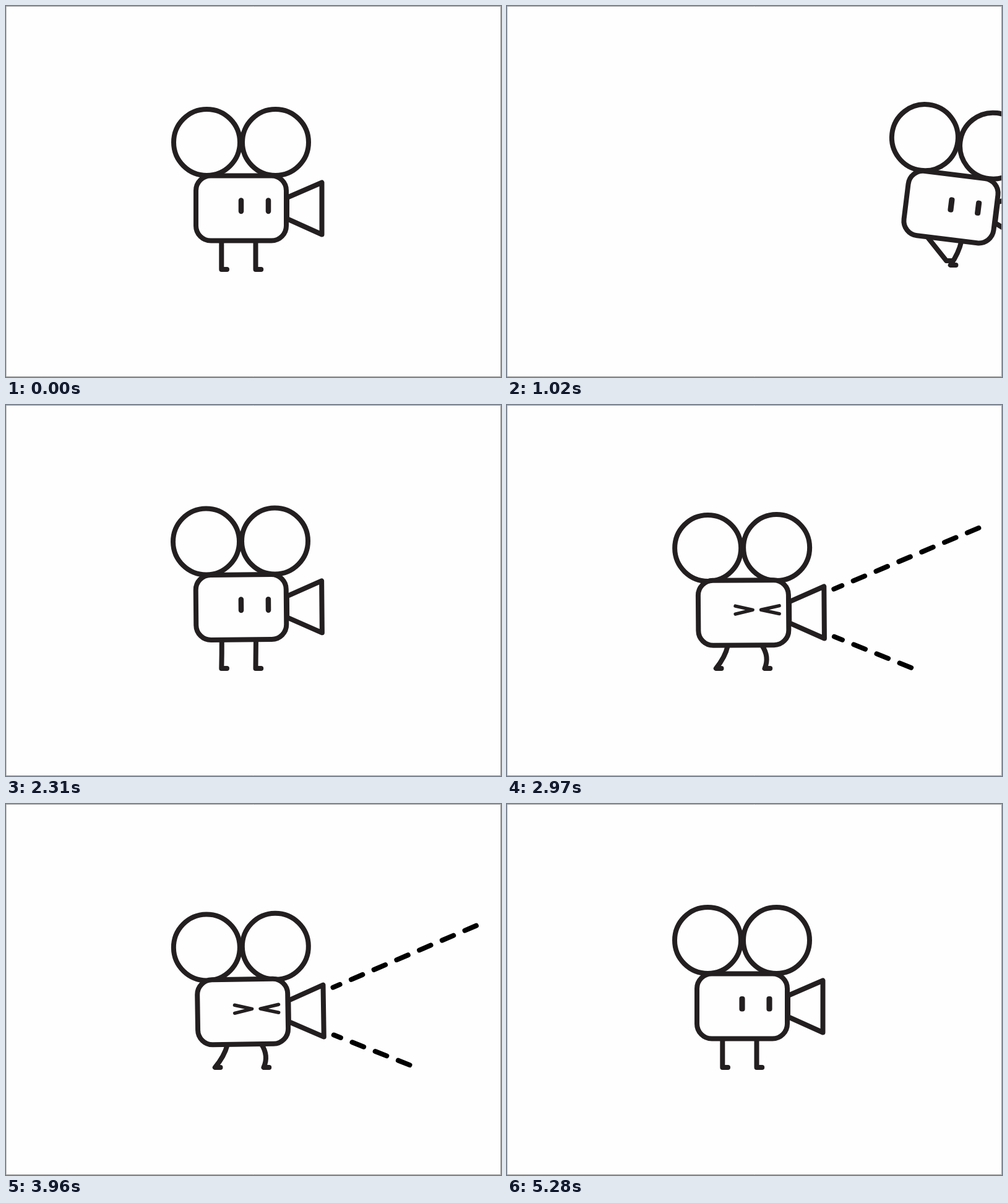
An HTML page with a canvas that plays this animation: 800 px wide and 600 px high, repeating every 5.31 s.

```html
<!DOCTYPE html>
<html lang="en">
<head>
<meta charset="utf-8">
<title>Film camera</title>
<style>
  html, body { margin: 0; height: 100%; overflow: hidden; background: #fefefe; }
  canvas { display: block; }
</style>
</head>
<body>
<canvas id="stage" width="800" height="600"></canvas>
<script>
const ctx = document.getElementById('stage').getContext('2d');
const LOOP = 5310, STEP = 30;
const INK = '#231f20', PAPER = '#fefefe';
const HOME = { x: 380, y: 327 }, FLOOR = 426, LEG = 46;
const RUN = 690, OFFSTAGE = 1230, LAND = 1740, SPEED = 1.25;

const mixPoint = (p, q, k) => p.map((v, i) => v + (q[i] - v) * k);
const progress = (t, from, to) => Math.min(1, Math.max(0, (t - from) / (to - from)));
const ease = (t, from, to) => {
  const x = progress(t, from, to);
  return x * x * (3 - 2 * x);
};
// Rises between a and b, falls between c and d.
const pulse = (t, a, b, c, d) => ease(t, a, b) - ease(t, c, d);
const hump = (t, from, to) => Math.sin(Math.PI * progress(t, from, to)) ** 2;
const arc = (t, from, to) => {
  const x = progress(t, from, to);
  return 4 * x * (1 - x);
};

const airborne = t => pulse(t, 110, 190, 400, 480) + pulse(t, OFFSTAGE, 1260, 1640, LAND);
const running = t => pulse(t, RUN, 760, 1200, 1260);
const strain = t => pulse(t, 2430, 2640, 4080, 4260);
const squint = t => pulse(t, 2580, 2670, 4080, 4170);
const blink = t => [600, 1380, 2430, 3990, 4860]
  .reduce((sum, s) => sum + pulse(t, s, s + 150, s + 270, s + 450), 0);

function runDistance(t) {
  const time = Math.max(0, t - RUN), warmUp = 120;
  return SPEED * (time < warmUp ? time * time / (2 * warmUp) : time - warmUp / 2);
}

// Offset from the resting place and tilt in degrees.
function getMove(t) {
  if (t < OFFSTAGE) {
    return {
      x: runDistance(t) - 34 * pulse(t, 100, 380, 380, 510),
      y: 14 * (hump(t, 0, 200) + hump(t, 410, 570)) - 215 * arc(t, 120, 460)
        + 8 * hump(t, 660, 780) + 3 * running(t) * Math.sin(t / 45),
      tilt: 7 * ease(t, RUN, 810) - 360 * ease(t, 120, 450)
    };
  }
  if (t < 2430) {
    const sway = hump(t, 1770, 2130);
    return {
      x: Math.min(0, SPEED * (t - LAND + 2.5)) + 20 * sway,
      y: 14 * hump(t, LAND, 2000) - 68.5 * arc(t, OFFSTAGE + 10, LAND),
      tilt: 15 * (ease(t, 1440, LAND) - 1) + 6 * sway - 1.8 * hump(t, 2040, 2370)
    };
  }
  const s = strain(t), u = t - 3540;
  return {
    x: s * (3.3 + 1.2 * Math.cos(u / 20)),
    y: s * (10 + Math.cos(u / 26)),
    tilt: s * (0.5 * Math.sin(u / 23) - 0.6)
  };
}

function strokeLine(points, close) {
  ctx.beginPath();
  points.forEach(p => ctx.lineTo(...p));
  if (close) ctx.closePath();
  ctx.stroke();
}

// Leap shapes (knee, ankle, toe) are measured from the body centre.
const LEGS = [
  { hip: -31.7, stance: -10.5, phase: 0, leap: [[-45, 78], [-74.6, 65], [-76, 70.6]] },
  { hip: 23.5, stance: 13, phase: Math.PI, leap: [[56, 52.8], [67, 77.4], [73.4, 74.2]] }
];

function drawLeg(leg, t, pose) {
  const c = Math.cos(pose.angle), s = Math.sin(pose.angle);
  const toStage = ([x, y]) => [pose.x + x * c - y * s, pose.y + x * s + y * c];
  const hip = toStage([leg.hip + 6 * strain(t), 53]);
  const run = running(t), phase = (t - RUN) / 45 + leg.phase;
  const carried = t < OFFSTAGE ? runDistance(t) : 0;
  const ankle = [
    HOME.x + leg.hip + carried + strain(t) * leg.stance + run * 28 * Math.sin(phase),
    FLOOR - run * (7 + 14 * Math.max(0, Math.cos(phase)))
  ];
  const reach = Math.hypot(hip[0] - ankle[0], hip[1] - ankle[1]);
  const middle = mixPoint(hip, ankle, 0.5);
  const knee = [middle[0] + 1.2 * Math.max(0, LEG - reach), middle[1]];
  const standing = [knee, ankle, [ankle[0] + 8.7, ankle[1]]];
  const [bend, heel, toe] = standing.map((p, i) =>
    mixPoint(p, toStage(leg.leap[i]), airborne(t)));
  ctx.beginPath();
  ctx.moveTo(...hip);
  ctx.quadraticCurveTo(...bend, ...heel);
  ctx.lineTo(...toe);
  ctx.stroke();
}

function drawBody(t) {
  const sink = strain(t);
  for (const x of [-55.5, 55.5]) {
    ctx.beginPath();
    ctx.arc(x - 1.2 * sink, -106.5 + 1.5 * sink, 53.5, 0, 7);
    ctx.stroke();
  }
  strokeLine([[74, -17], [130.5, -41.5], [130.5, 42.5], [74, 17]], true);
  ctx.fillStyle = PAPER;
  ctx.beginPath();
  ctx.roundRect(-73, -52.5, 146, 105, 24);
  ctx.fill();
  ctx.stroke();
}

function drawEyes(t) {
  const open = squint(t);
  if (open > 0) {
    ctx.lineWidth = 5.5;
    const h = 6.5 * open;
    for (const [outer, tip] of [[-13, 15], [58, 28.5]]) {
      strokeLine([[outer, -4.5 - h], [tip, -4.5], [outer, -4.5 + h]]);
    }
    return;
  }
  const b = blink(t), w = 8.5 + 8.5 * b, h = 26 - 21 * b;
  ctx.fillStyle = INK;
  for (const x of [0, 44]) {
    ctx.beginPath();
    ctx.roundRect(x - w / 2, -3.7 - h / 2, w, h, 4.2 - 3 * b);
    ctx.fill();
  }
}

function drawBeams(t) {
  const from = ease(t, 4080, 4230), to = ease(t, 2580, 2820);
  if (from >= to) return;
  const flow = 0.2 * (t - 3540) - 12;
  ctx.strokeStyle = '#000';
  ctx.lineWidth = 8;
  ctx.setLineDash([20, 20]);
  for (const [side, length] of [[-1, 265], [1, 138]]) {
    const at = k => [146.5 + k * length * 0.924, 1.2 + side * (38.5 + k * length * 0.382)];
    ctx.lineDashOffset = from * length - flow;
    strokeLine([at(from), at(to)]);
  }
  ctx.setLineDash([]);
}

function draw(t) {
  const move = getMove(t);
  const pose = { x: HOME.x + move.x, y: HOME.y + move.y, angle: move.tilt * Math.PI / 180 };
  ctx.fillStyle = PAPER;
  ctx.fillRect(0, 0, 800, 600);
  ctx.strokeStyle = INK;
  ctx.lineWidth = 8;
  ctx.lineCap = ctx.lineJoin = 'round';
  LEGS.forEach(leg => drawLeg(leg, t, pose));
  ctx.save();
  ctx.translate(pose.x, pose.y);
  ctx.rotate(pose.angle);
  drawBody(t);
  drawEyes(t);
  drawBeams(t);
  ctx.restore();
  ctx.strokeStyle = '#999';
  ctx.lineWidth = 1;
  ctx.strokeRect(0.5, 0.5, 799, 599);
}

const start = performance.now();
function tick() {
  const t = (performance.now() - start) % LOOP;
  draw(Math.floor(t / STEP) * STEP);
  requestAnimationFrame(tick);
}
tick();
</script>
</body>
</html>
```
